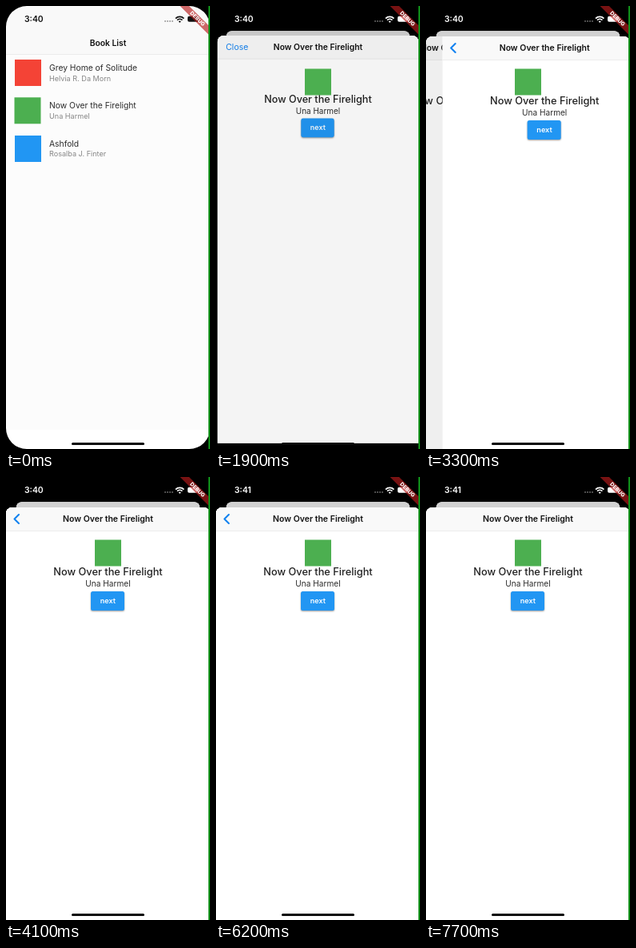
An HTML page for the animation above (8000 ms loop, 255 by 554 pixels).

```html
<!DOCTYPE html>
<html lang="en">
<head>
<meta charset="utf-8">
<title>Stacked sheets</title>
<style>
html, body { margin: 0; width: 100%; height: 100%; overflow: hidden; background: #000; }
#stage { position: relative; width: 255px; height: 554px; overflow: hidden; background: #000;
  font: 10.3px/16px Inter, "Open Sans", sans-serif; color: #2c2c2c; white-space: nowrap; }
#stage div, #stage svg { position: absolute; }
.layer, .shade { left: 0; top: 0; width: 255px; height: 554px; transform-origin: 50% 0; }
.shade { background: #000; opacity: 0; }
#list { background: linear-gradient(#f9f9f9 60px, #ececec 60px 61px, #fcfcfc 61px 530px, #fff 530px); overflow: hidden; }
.mid { left: 0; width: 100%; text-align: center; }
.bold { font-weight: 600; color: #111; }
.tile { width: 33px; height: 33px; }
.author { font-size: 9.1px; color: #868686; }
.sheet { left: 0; top: 37.5px; width: 255px; height: 517px; border-radius: 8px 8px 0 0; overflow: hidden; background: #fff; }
.page { left: 0; top: 0; width: 255px; height: 517px; background: #fff; }
.bar { left: 0; top: 0; width: 255px; height: 29px; background: #f9f9f9; border-bottom: 1px solid #ededed; }
.close { left: 10.5px; top: 7.5px; font-size: 10.7px; color: #1583f0; }
.button { left: 106.3px; top: 105.5px; width: 42px; height: 24px; border-radius: 2.5px; text-align: center;
  font: 600 9.1px/24px Inter, sans-serif; color: #fff; background: #2196f3; box-shadow: 0 1px 2px rgba(0,0,0,.4); }
.button.off { color: #9c9c9c; background: #dfdfdf; box-shadow: none; }
#status { left: 0; top: 0; width: 255px; height: 30px; }
#clock { left: 23px; top: 8.5px; font-size: 10.4px; font-weight: 600; }
#debug { left: 211.5px; top: 12.2px; width: 54.4px; height: 8.2px; transform: rotate(45deg); text-align: center;
  font: 800 6.7px/8.2px Inter, sans-serif; color: #fff; background: rgba(183,28,28,.66); }
#home { left: 82px; top: 546px; width: 91px; height: 3.4px; border-radius: 2px; background: #080808; }
#edge { left: 253px; top: 0; width: 2px; height: 554px; background: #10901a; }
</style>
</head>
<body>
<div id="stage"></div>
<script>
const books = [
  ['Grey Home of Solitude', 'Helvia R. Da Morn', '#f44336'],
  ['Now Over the Firelight', 'Una Harmel', ''],
  ['Ashfold', 'Rosalba J. Finter', '#2196f3'],
];
const [title, author] = books[1];
const openTimes = [300, 1300, 1900, 2500, 4200];

const leads = {
  close: '<div class="close">Close</div>',
  back: `<svg width="24" height="29"><path d="M16 9l-5.5 5.5L16 20" fill="none" stroke="#1583f0"
    stroke-width="2.1" stroke-linecap="round" stroke-linejoin="round"/></svg>`,
  none: '',
};

const page = (lead, off = '') => `<div class="page">
  <div class="bar">${leads[lead]}<div class="mid bold" style="top:7.5px;font-size:10.5px">${title}</div></div>
  <div class="mid" style="top:73.5px;font-size:12.8px;font-weight:500;color:#222">${title}</div>
  <div class="mid" style="top:87.6px;font-size:10.1px">${author}</div>
  <div class="button ${off}">next</div>
  <div class="shade"></div></div>`;

const row = ([name, by, color], i) => `
  <div class="tile" style="left:10.5px;top:${67 + 47.3 * i}px;background:${color}"></div>
  <div style="left:54px;top:${69 + 47.3 * i}px">${name}</div>
  <div class="author" style="left:54px;top:${82.7 + 47.3 * i}px">${by}</div>`;

const contents = [page('close'), page('close'), page('close'),
  page('none') + page('back') + page('back'), page('close', 'off')];

const stage = document.getElementById('stage');
stage.innerHTML = `
  <div class="layer" id="list">
    <div class="mid bold" style="top:37.5px">Book List</div>${books.map(row).join('')}
  </div>
  ${contents.map(html => `<div class="shade barrier"></div>
    <div class="layer"><div class="sheet">${html}</div></div>`).join('')}
  <div class="tile" id="hero" style="background:#4caf50"></div>
  <div id="status"><div id="clock"></div>
    <svg width="255" height="30" fill="currentColor">
      <g opacity=".4"><circle cx="199" cy="19" r="1"/><circle cx="202" cy="19" r="1"/>
        <circle cx="205" cy="19" r="1"/><circle cx="208" cy="19" r="1"/></g>
      <g fill="none" stroke="currentColor" stroke-width="1.7">
        <path d="M212 15.6a7.4 7.4 0 0 1 10.4 0M214 17.7a4.6 4.6 0 0 1 6.4 0"/></g>
      <path d="M215.7 19.2a2.2 2.2 0 0 1 3 0l-1.5 1.7z"/>
      <rect x="227" y="12.7" width="14" height="7" rx="2"/>
      <rect x="241.6" y="15" width="1" height="2.4" rx=".5"/>
    </svg></div>
  <div id="home"></div><div id="debug">DEBUG</div><div id="edge"></div>`;

const find = s => [...stage.querySelectorAll(s)];
const [list, ...sheets] = find('.layer');
const barriers = find('.barrier');
const stack = [...sheets[3].querySelectorAll('.page')];
const [hero] = find('#hero'), [status] = find('#status'), [clock] = find('#clock');

const clamp = x => Math.min(1, Math.max(0, x));
const easeOut = (x, n) => 1 - (1 - x) ** n;
const rise = (t, start) => t < start ? 0 : clamp((t - start + 50) / 350);
const push = (t, start) => t < start ? 0 : easeOut(clamp((t - start + 10) / 410), 3.5);

function draw(t) {
  const open = openTimes.map(s => rise(t, s));
  open[4] -= rise(t, 5900);

  const first = open[0];
  list.style.transform = `translateY(${31 * first}px) scale(${1 - first / 10})`;
  list.style.borderRadius = 26 - 18 * first + 'px';

  sheets.forEach((sheet, i) => {
    const covered = open[i + 1] || 0;
    // the sheet lags slightly behind the page it covers
    const up = easeOut(clamp((open[i] - .2) / .8), 2);
    sheet.style.transform = `translateY(${(1 - up) * 518 - 2.75 * covered}px) scale(${1 - covered / 10})`;
    barriers[i].style.opacity = .16 * easeOut(open[i], 2);
  });

  const shown = [1, push(t, 3100) - push(t, 7300), push(t, 3700) - push(t, 6700), 0];
  stack.forEach((el, i) => {
    el.style.transform = `translateX(${255 * (1 - shown[i]) - 85 * shown[i + 1]}px)`;
    el.lastElementChild.style.opacity = .07 * shown[i + 1];
  });

  const fly = first * first * (3 - 2 * first);
  hero.style.transform = `translate(${10.5 + 100.5 * fly}px, ${114.3 - 35.8 * fly}px)`;
  status.style.color = first > .4 ? '#fff' : '#111';
  clock.textContent = t < 5900 ? '3:40' : '3:41';
}

function tick() {
  // motion advances in steps of 100 ms
  draw(Math.floor(performance.now() % 8000 / 100) * 100);
  requestAnimationFrame(tick);
}
tick();
</script>
</body>
</html>
```
